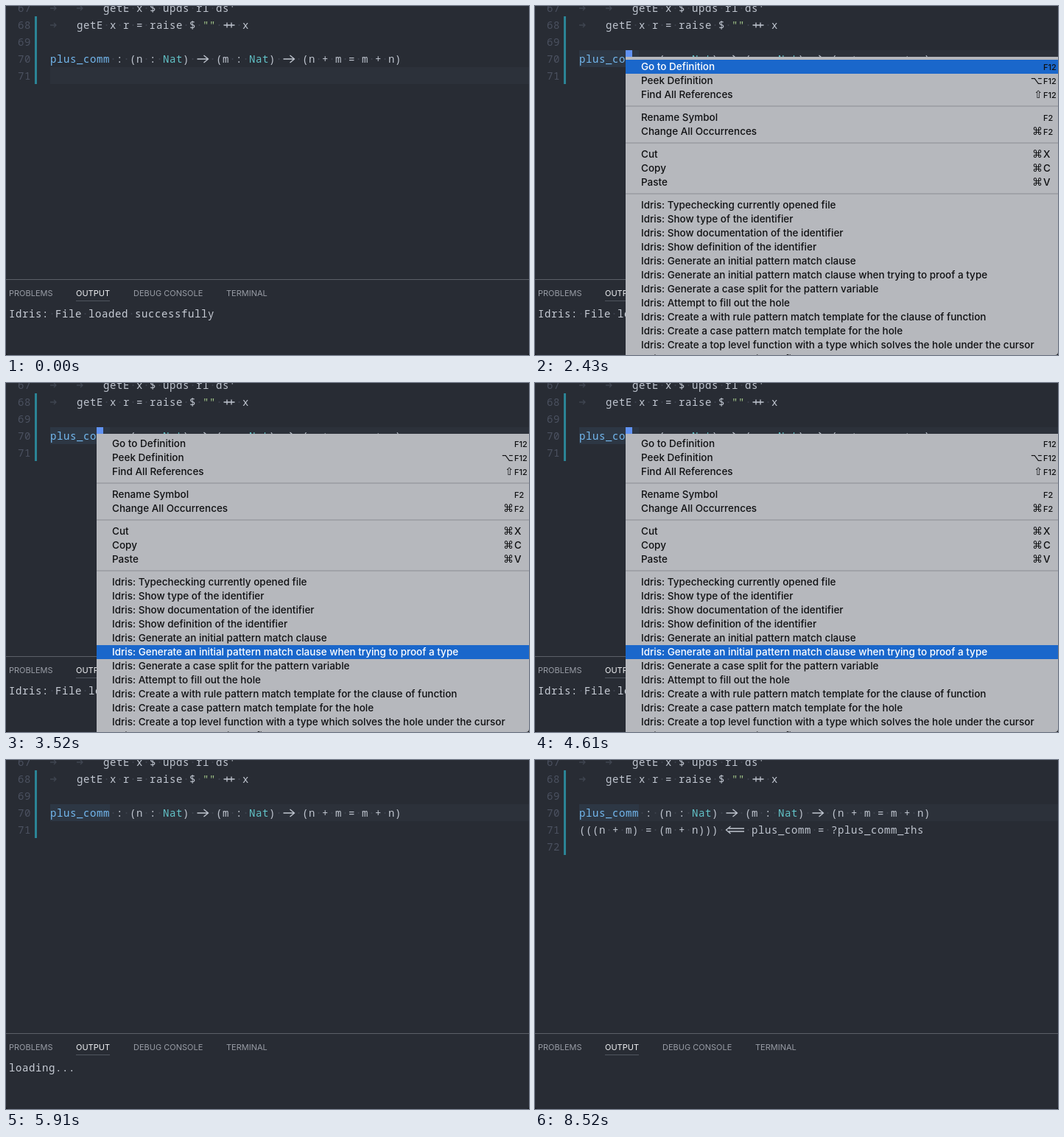
These frames come from a looping animation (710x474 px, 8.82 s). An HTML page:

```html
<!DOCTYPE html>
<html lang="en">
<head>
<meta charset="utf-8">
<title>Editor: generate a pattern match clause</title>
<style>
  html, body { margin: 0; width: 100%; height: 100%; overflow: hidden; background: #282c34; }
  svg { display: block; width: 710px; height: 474px; }
  text { white-space: pre; }
  .code { font: 14px "Noto Sans Mono", "DejaVu Sans Mono", monospace; letter-spacing: .6px; }
  .tab { font: 11px Inter, Roboto, sans-serif; }
  .item { font: 500 13.5px Inter, Roboto, sans-serif; }
  .key { font: 500 11px Inter, Roboto, sans-serif; }
  .mod { font: 14px "DejaVu Sans", sans-serif; text-anchor: end; }
  .lig { fill: none; stroke-width: 1.3; }
</style>
</head>
<body>
<svg id="stage" viewBox="0 0 710 474"></svg>
<script>
const LOOP = 8820;
const CLICK = 1870, WORD = 2060, MENU = 2250, FADE = 4640, FADE_END = 4850;
const LOADING = 4900, INSERT = 6200;
const BLINK = 970, BLINK_START = 5000, BLINK_END = 8520;

const COL = 9, LEFT = 60, ROW = 23;
const INK = '#c0c6d0', DIM = '#4b5160', FAINT = '#3f4550';
const BLUE = '#74b9f0', CYAN = '#62c3c8', GREEN = '#a3c78a';
const MENU_INK = '#101113';

const stage = document.getElementById('stage');

function add(parent, tag, attrs, content) {
  const el = document.createElementNS('http://www.w3.org/2000/svg', tag);
  for (const name in attrs) el.setAttribute(name, attrs[name]);
  if (content !== undefined) el.textContent = content;
  parent.appendChild(el);
  return el;
}
const group = (parent = stage) => add(parent, 'g', {});
const rect = (parent, x, y, width, height, fill) =>
  add(parent, 'rect', { x, y, width, height, fill });
const label = (parent, cls, x, y, content, fill) =>
  add(parent, 'text', { class: cls, x, y, fill }, content);
const show = (el, on) => el.setAttribute('visibility', on ? 'visible' : 'hidden');

// Joined operators, drawn from the left edge and middle of their cells.
const LIGATURES = {
  '->': 'M1.5 0H16.5M10.5 -5L16.5 0L10.5 5',
  '<==': 'M7.5 -5L1.5 0L7.5 5M5 -2H26M5 2H26',
  '++': 'M1.5 0H16.5M6 -3.5V3.5M12 -3.5V3.5'
};

// Draws coloured runs of code with a faint dot in every space.
function code(parent, x, mid, runs) {
  for (const [run, fill] of runs) {
    for (const part of run.split(/(->|<==|\+\+)/)) {
      if (LIGATURES[part]) {
        add(parent, 'path', {
          class: 'lig', d: LIGATURES[part], stroke: fill,
          transform: `translate(${x} ${mid})`
        });
      } else if (part) {
        label(parent, 'code', x, mid + 5, part, fill);
        [...part].forEach((c, i) => {
          if (c === ' ') {
            add(parent, 'circle', { cx: x + (i + .5) * COL, cy: mid, r: 1, fill: FAINT });
          }
        });
      }
      x += part.length * COL;
    }
  }
}

function tabArrow(x, mid) {
  add(stage, 'path', {
    class: 'lig', d: 'M0 0H8M5 -3L8 0L5 3', stroke: FAINT,
    transform: `translate(${x} ${mid})`
  });
}

const lineMid = n => 3 + (n - 67) * ROW;
const lineTop = n => lineMid(n) - 12;

// Editor
rect(stage, 0, 0, 710, 474, '#282c34');
const activeLine = rect(stage, LEFT, 0, 650, ROW, '#2c313a');
const word = rect(stage, LEFT, lineTop(70), 9 * COL, ROW, '#2d3744');
const bar = rect(stage, 39, 14, 3, 92, '#2b8495');

const number = (parent, n) => label(parent, 'code', 16, lineMid(n) + 5, n, DIM);
for (let n = 67; n <= 71; n++) number(stage, n);

tabArrow(60, lineMid(67));
tabArrow(96, lineMid(67));
tabArrow(60, lineMid(68));
code(stage, LEFT + 8 * COL, lineMid(67), [["getE x $ upds rl ds'", INK]]);
code(stage, LEFT + 4 * COL, lineMid(68),
  [['getE x r = raise $ ', INK], ['""', GREEN], [' ++ x', INK]]);
code(stage, LEFT, lineMid(70), [
  ['plus_comm', BLUE], [' : (n : ', INK], ['Nat', CYAN], [') -> (m : ', INK],
  ['Nat', CYAN], [') -> (n + m = m + n)', INK]
]);

const clause = group();
number(clause, 72);
code(clause, LEFT, lineMid(71),
  [['(((n + m) = (m + n))) <== plus_comm = ?plus_comm_rhs', INK]]);

const caret = group();
const caretBlock = rect(caret, LEFT, 0, COL, ROW, '#6092f3');
const caretChar = label(caret, 'code', LEFT + 7 * COL, lineMid(70) + 5, 'm', '#98958f');

// Panel
rect(stage, 0, 371, 710, 1, '#5c6068');
[[4, 'PROBLEMS'], [95, 'OUTPUT'], [173, 'DEBUG CONSOLE'], [299, 'TERMINAL']]
  .forEach(([x, name]) =>
    label(stage, 'tab', x, 394, name, name === 'OUTPUT' ? '#f2f3f5' : '#989ca5'));
rect(stage, 95, 400, 46, 1, '#50555f');

const loaded = group(), loading = group();
code(loaded, 4, 418, [['Idris: File loaded successfully', '#c8cdd6']]);
code(loading, 4, 418, [['loading...', '#c8cdd6']]);

// Context menu: label, modifier, key; null is a separator.
const ENTRIES = [
  ['Go to Definition', '', 'F12'],
  ['Peek Definition', '⌥', 'F12'],
  ['Find All References', '⇧', 'F12'],
  null,
  ['Rename Symbol', '', 'F2'],
  ['Change All Occurrences', '⌘', 'F2'],
  null,
  ['Cut', '⌘', 'X'],
  ['Copy', '⌘', 'C'],
  ['Paste', '⌘', 'V'],
  null,
  ...[
    'Typechecking currently opened file',
    'Show type of the identifier',
    'Show documentation of the identifier',
    'Show definition of the identifier',
    'Generate an initial pattern match clause',
    'Generate an initial pattern match clause when trying to proof a type',
    'Generate a case split for the pattern variable',
    'Attempt to fill out the hole',
    'Create a with rule pattern match template for the clause of function',
    'Create a case pattern match template for the hole',
    'Create a top level function with a type which solves the hole under the cursor',
    'Show all the holes in the file'
  ].map(name => ['Idris: ' + name, '', ''])
];

const menu = group();
rect(menu, 123, 69, 587, 405, '#b6b8bd');
const hoverBar = rect(menu, 123, 0, 587, 19, '#1a67cb');
const items = [];
let mid = 82;
for (const entry of ENTRIES) {
  if (!entry) {
    rect(menu, 123, mid - 4, 587, 2, '#a0a2a8');
    mid += 12;
    continue;
  }
  const [name, mod, key] = entry;
  items.push({ mid, text: label(menu, 'item', 144, mid + 5, name, MENU_INK) });
  if (mod) label(menu, 'mod', 689, mid + 5, mod, MENU_INK);
  if (key) label(menu, key.length > 1 ? 'key' : 'item', 690, mid + 5, key, MENU_INK);
  mid += 19;
}

// Rounded lower window corners
add(stage, 'path', {
  d: 'M0 470V474H4A4 4 0 0 1 0 470M710 470V474H706A4 4 0 0 0 710 470', fill: '#16181c'
});

// Time and index of the item under the pointer; -1 is none.
const HOVER = [
  [0, -1], [2400, 0], [2480, 2], [2560, 5], [2640, 8], [2720, 9], [2790, 10],
  [2960, 11], [3100, 12], [3260, 13], [4560, -1], [4600, 13]
];

const clamp = v => Math.min(1, Math.max(0, v));
const smooth = v => v * v * (3 - 2 * v);

// Soft blink: hidden, fade in, hold, fade out.
function blink(time) {
  const u = ((time % BLINK) + BLINK) % BLINK;
  return smooth(clamp((u - 390) / 200)) * (1 - smooth(clamp((u - 770) / 200)));
}

function caretOpacity(t) {
  if (t < CLICK) return blink(t + 150);
  return t < BLINK_START ? 1 : blink(t - BLINK_END);
}

function render(t) {
  const clicked = t >= CLICK, inserted = t >= INSERT;
  const line = clicked ? 70 : 71;

  activeLine.setAttribute('y', lineTop(line));
  show(word, t >= WORD);
  caretBlock.setAttribute('x', clicked ? LEFT + 7 * COL : LEFT);
  caretBlock.setAttribute('y', lineTop(line));
  show(caretChar, clicked);
  // The last blink ends hidden and stays so until the loop restarts.
  caret.setAttribute('opacity', t < BLINK_END ? caretOpacity(t) : 0);

  show(clause, inserted);
  bar.setAttribute('height', inserted ? 115 : 92);
  show(loaded, t < LOADING);
  show(loading, t >= LOADING && !inserted);

  menu.setAttribute('opacity', t < MENU ? 0 : clamp((FADE_END - t) / (FADE_END - FADE)));
  const hover = HOVER.filter(([time]) => time <= t).pop()[1];
  hoverBar.setAttribute('opacity', hover < 0 ? 0 : 1);
  if (hover >= 0) hoverBar.setAttribute('y', items[hover].mid - 9);
  items.forEach((item, i) => item.text.setAttribute('fill', i === hover ? '#fff' : MENU_INK));
}

const start = performance.now();
function tick() {
  render((performance.now() - start) % LOOP);
  requestAnimationFrame(tick);
}
tick();
</script>
</body>
</html>
```
